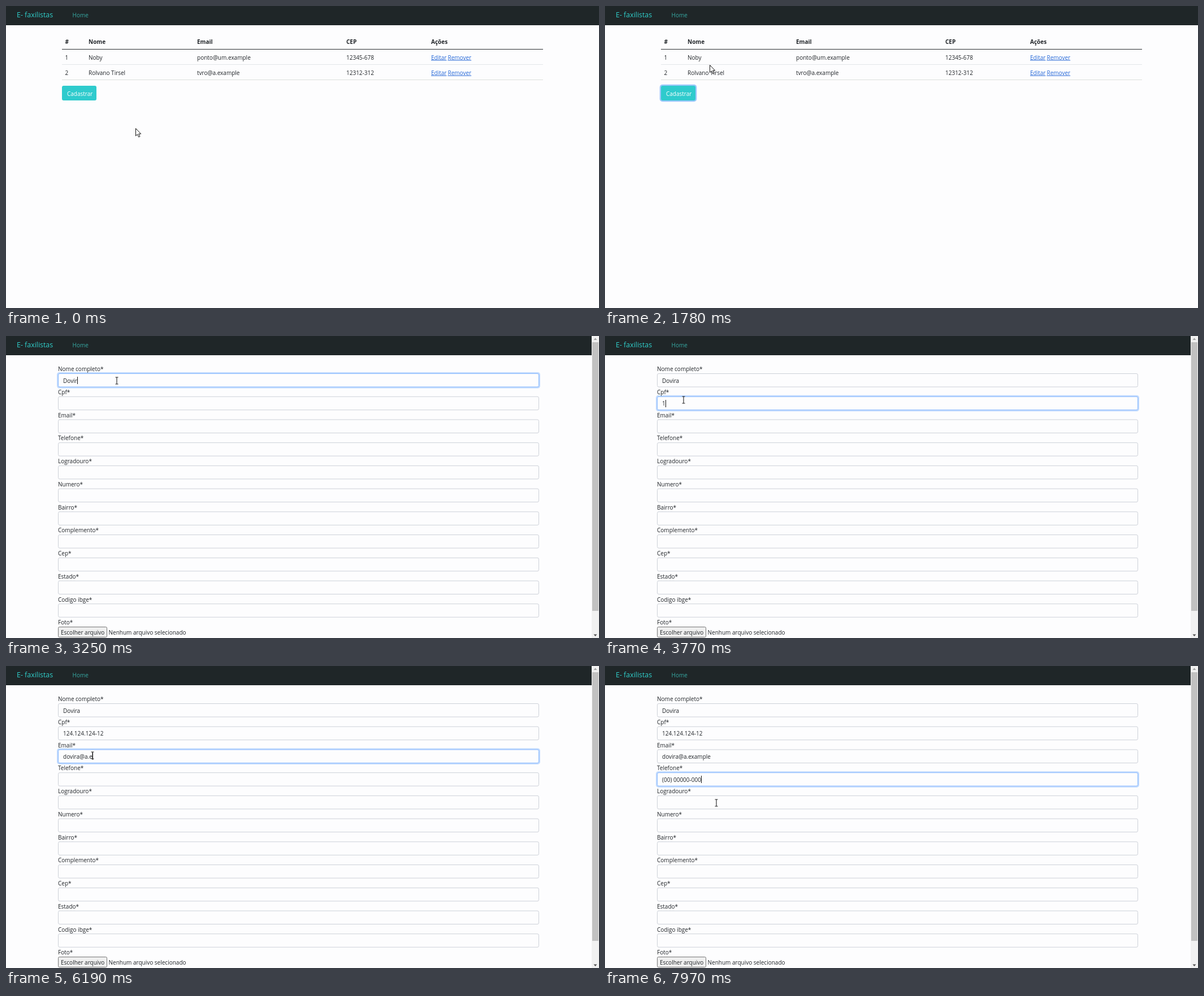
Animation, 1049 px wide and 534 px high, one loop 8 s. Source, as an HTML page:

```html
<!DOCTYPE html>
<html lang="pt-BR">
<head>
<meta charset="utf-8">
<title>Cadastro</title>
<style>
  html, body { margin: 0; width: 100%; height: 100%; overflow: hidden; background: #fdfdfe; }
  svg { display: block; width: 1049px; height: 534px; }
  text { font: 10px "Open Sans", "Noto Sans", sans-serif; fill: #212529; white-space: pre; }
  .bold { font-weight: 700; }
  .brand { font-size: 12.4px; fill: #30d0cc; }
  .home { fill: #37a9a3; }
  .link { fill: #2a6bd8; text-decoration: underline; }
  .light { fill: #fff; }
</style>
</head>
<body>
<svg id="stage" viewBox="0 0 1049 534"></svg>
<script>
const LOOP = 8000, FORM_AT = 2150, BUTTON_CLICK = 1150;
const FIELD_X = 92, FIELD_W = 851, FIELD_H = 24.5, TEXT_X = 101;
const fieldTop = i => 66 + i * 40.72;
const stage = document.getElementById('stage');

function add(parent, tag, attrs, content) {
  const el = document.createElementNS('http://www.w3.org/2000/svg', tag);
  for (const key in attrs) el.setAttribute(key, attrs[key]);
  if (content !== undefined) el.textContent = content;
  parent.appendChild(el);
  return el;
}
const group = parent => add(parent, 'g', {});
const rect = (parent, x, y, width, height, fill, more) =>
  add(parent, 'rect', { x, y, width, height, fill, ...more });
const label = (parent, x, y, content, cls = '') =>
  add(parent, 'text', { x, y, class: cls }, content);
const path = (parent, d, fill, more) => add(parent, 'path', { d, fill, ...more });
const show = (el, on) => el.setAttribute('visibility', on ? 'visible' : 'hidden');

rect(stage, 0, 0, 1049, 534, '#fdfdfe');
rect(stage, 0, 0, 1049, 34, '#1f2628');
label(stage, 19, 19.5, 'E- faxilistas', 'brand');
label(stage, 117.5, 19.5, 'Home', 'home');

// List page
const list = group(stage);
const columns = [104.5, 146, 338, 602, 752];
['#', 'Nome', 'Email', 'CEP', 'Ações'].forEach((s, i) => label(list, columns[i], 67, s, 'bold'));
[
  ['1', 'Noby', 'ponto@um.example', '12345-678'],
  ['2', 'Rolvano Tirsel', 'tvro@a.example', '12312-312']
].forEach((row, r) => {
  const y = 94.5 + r * 27.2;
  row.forEach((s, i) => label(list, columns[i], y, s));
  label(list, 752, y, 'Editar', 'link');
  label(list, 781.5, y, 'Remover', 'link');
});
rect(list, 99, 76, 851, 1, '#2b2f33');
rect(list, 99, 103, 851, 1, '#e3e6e9');
rect(list, 99, 130, 851, 1, '#dcdfdc');
const buttonRing = rect(list, 96.7, 138.7, 65.6, 30.6, '#9cc8fb', { rx: 5 });
rect(list, 99, 141, 61, 26, '#2fcbcd', { rx: 3 });
label(list, 108, 158.5, 'Cadastrar', 'light');

// Form page
const form = group(stage);
const names = ['Nome completo', 'Cpf', 'Email', 'Telefone', 'Logradouro', 'Numero',
  'Bairro', 'Complemento', 'Cep', 'Estado', 'Codigo ibge'];
const entries = [
  { text: 'Dovira', focus: 2400, start: 2800, step: 100 },
  { text: '124.124.124-12', focus: 3560, start: 3740, step: 43 },
  { text: 'dovira@a.example', focus: 4500, start: 5400, step: 85 },
  { text: '(00) 00000-000', focus: 6960, start: 7150, step: 60 }
];
const ring = rect(form, FIELD_X - 2, 0, FIELD_W + 4, FIELD_H + 4, '#c2dbfe', { rx: 4.5 });
const boxes = names.map((name, i) => {
  label(form, FIELD_X, fieldTop(i) - 3.7, name + '*');
  return rect(form, FIELD_X + .5, fieldTop(i) + .5, FIELD_W - 1, FIELD_H - 1, '#fdfdfe', { rx: 2.5 });
});
entries.forEach((e, i) => e.node = label(form, TEXT_X, fieldTop(i) + 16.7, ''));
const caret = rect(form, 0, 0, 1, 13, '#111');

label(form, FIELD_X, 510.2, 'Foto*');
rect(form, 92.5, 514.5, 86, 18, '#efefef', { rx: 2, stroke: '#767676' });
label(form, 97, 528, 'Escolher arquivo');
label(form, 181.5, 527.5, 'Nenhum arquivo selecionado');

rect(form, 1036, 0, 13, 534, '#f1f1f1');
rect(form, 1037, 11, 11, 475, '#c1c1c1');
path(form, 'M1039.5 7h6l-3-3.5z', '#a3a3a3');
path(form, 'M1039.5 527.5h6l-3 3.5z', '#505050');

// Pointers
const pointer = group(stage);
const arrow = path(pointer, 'M.5.5v13.2l3-2.8 2.2 4.8 2.2-1-2.2-4.6h4z', '#fff',
  { stroke: '#111', 'stroke-width': 1 });
const hand = path(pointer, 'M-1.5 1.5q1.5-2 3 0v5l6 1.5q1.5.5 1.5 2v3l-2 4h-7l-4-6q0-2 2.5-.5z', '#fff',
  { stroke: '#111', 'stroke-width': 1 });
const beam = path(pointer, 'M-2.5-6h2l.5.5.5-.5h2M0-5.5v11M-2.5 6h2l.5-.5.5.5h2', 'none',
  { stroke: '#222', 'stroke-width': 1.1 });

// time, x, y
const route = [
  [0, 229, 216], [300, 229, 216], [900, 140, 158], [1300, 140, 158], [1740, 185, 104],
  [1880, 185, 104], [2300, 196, 79], [3250, 196, 79], [3540, 139, 113], [4320, 139, 113],
  [4480, 153, 158], [6700, 153, 158], [6940, 175, 200], [7150, 175, 200], [7500, 197, 242],
  [LOOP, 197, 242]
];
function pointerAt(t) {
  const i = route.findIndex(p => p[0] > t);
  const [t0, x0, y0] = route[i - 1], [t1, x1, y1] = route[i];
  const u = (t - t0) / (t1 - t0), k = u * u * (3 - 2 * u);
  return [x0 + (x1 - x0) * k, y0 + (y1 - y0) * k];
}

function typedCount(e, t) {
  if (t < e.start) return 0;
  return Math.min(e.text.length, 1 + Math.floor((t - e.start) / e.step));
}

function drawForm(t) {
  const active = entries.filter(e => t >= e.focus).length - 1;
  entries.forEach((e, i) => e.node.textContent = e.text.slice(0, typedCount(e, t)));
  boxes.forEach((box, i) => box.setAttribute('stroke', i === active ? '#86b7fe' : '#cdd1d8'));
  show(ring, active >= 0);
  if (active < 0) return show(caret, false);

  const e = entries[active], count = typedCount(e, t), top = fieldTop(active);
  const lastInput = count ? e.start + (count - 1) * e.step : e.focus;
  ring.setAttribute('y', top - 2);
  caret.setAttribute('x', Math.round(TEXT_X + (count ? e.node.getComputedTextLength() : 0)));
  caret.setAttribute('y', Math.round(top + 6));
  show(caret, (t - lastInput) % 1000 < 500);
}

function drawPointer(t, onForm) {
  const [x, y] = pointerAt(t);
  const overField = onForm && names.some((_, i) => y >= fieldTop(i) && y <= fieldTop(i) + FIELD_H);
  const overButton = !onForm && x > 99 && x < 160 && y > 141 && y < 167;
  pointer.setAttribute('transform', `translate(${x.toFixed(1)} ${y.toFixed(1)})`);
  show(beam, overField);
  show(hand, overButton);
  show(arrow, !overField && !overButton);
}

function draw(t) {
  const onForm = t >= FORM_AT;
  list.style.display = onForm ? 'none' : '';
  form.style.display = onForm ? '' : 'none';
  show(buttonRing, t >= BUTTON_CLICK);
  if (onForm) drawForm(t);
  drawPointer(t, onForm);
}

const began = performance.now();
function tick() {
  draw((performance.now() - began) % LOOP);
  requestAnimationFrame(tick);
}
tick();
</script>
</body>
</html>
```
